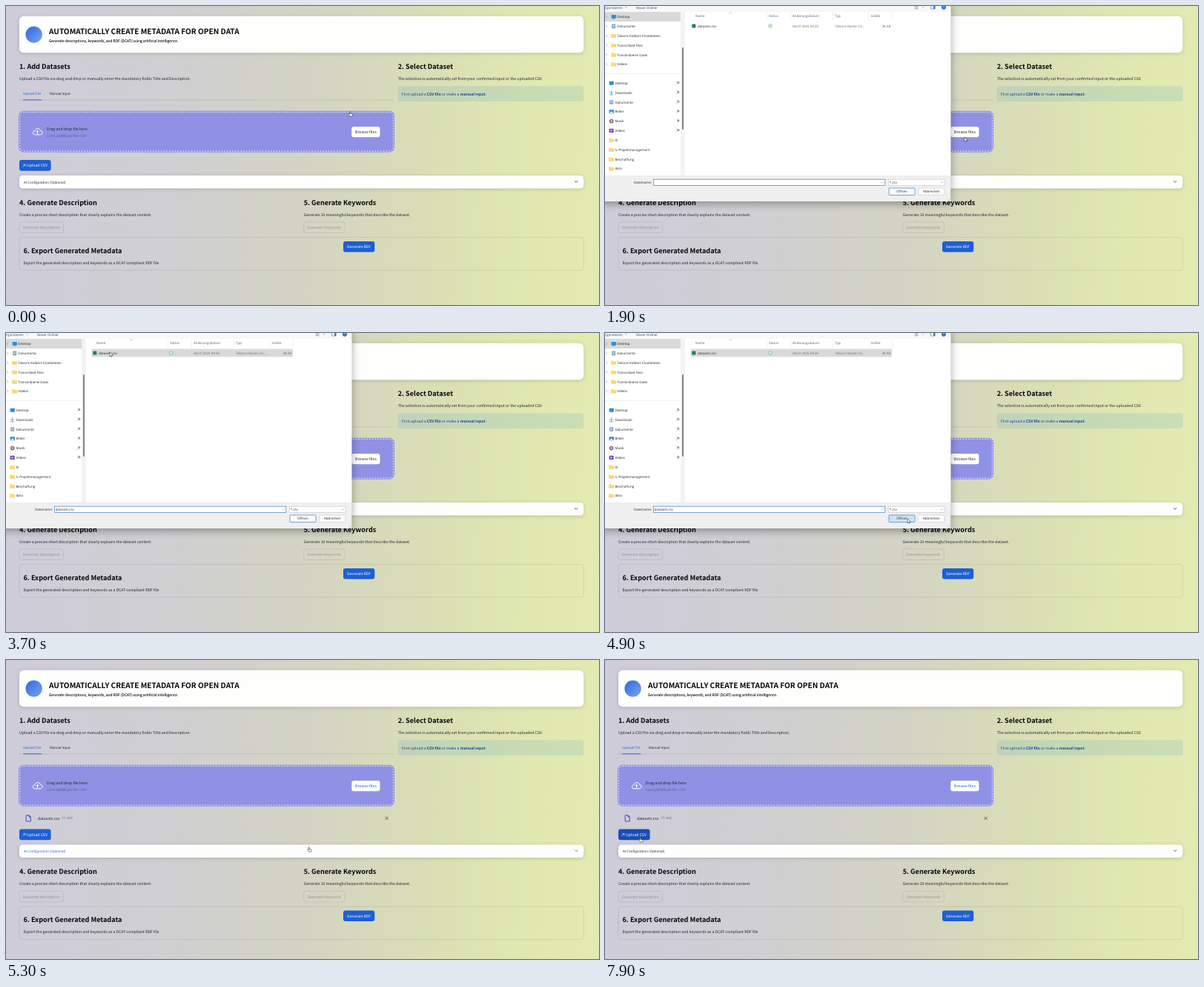
Animation, 800 px wide and 404 px high, one loop 8 s. Source, as an HTML page:

```html
<!DOCTYPE html>
<html lang="en">
<head>
<meta charset="utf-8">
<style>
  html, body { margin: 0; width: 100%; height: 100%; overflow: hidden; }
  body { background: linear-gradient(92deg, #cfccda 0%, #d0cfd0 30%, #d3d4c3 52%, #d9deb5 70%, #e0e8b0 88%, #e3ebb2 100%); }
  svg { display: block; width: 800px; height: 404px; }
  text { font-family: "Noto Sans CJK JP", "Noto Sans CJK SC", "Noto Sans CJK KR", sans-serif; text-rendering: geometricPrecision; white-space: pre; }
  .dialog text { font-family: "Open Sans", "Noto Sans", sans-serif; }
  .card { filter: drop-shadow(0 1.5px 2.5px rgba(0, 0, 0, .17)); }
  .window { filter: drop-shadow(0 3px 6px rgba(0, 0, 0, .35)); }
</style>
</head>
<body>
<svg id="stage" viewBox="0 0 800 404"></svg>
<script>
const INK = '#20222b', BLUE = '#1f5fd2', LINE = 'rgba(49,51,63,.18)', FADED = 'rgba(49,51,63,.38)';
const BODY = 5.17, SMALL = 4.53, HEAD = 9.12, WIN = 4.45;

const text = (x, y, s, size = BODY, fill = INK, extra = '') =>
  `<text x="${x}" y="${y}" font-size="${size}" fill="${fill}" ${extra}>${s}</text>`;
const head = (x, y, s, size = HEAD) => text(x, y, s, size, '#07080c', 'font-weight="700"');
const rect = (x, y, w, h, fill, r = 0, extra = '') =>
  `<rect x="${x}" y="${y}" width="${w}" height="${h}" rx="${r}" fill="${fill}" ${extra}/>`;
const path = (d, stroke, width = .7, fill = 'none', extra = '') =>
  `<path d="${d}" stroke="${stroke}" stroke-width="${width}" fill="${fill}" stroke-linejoin="round" stroke-linecap="round" ${extra}/>`;
const group = (id, body, extra = '') => `<g id="${id}" ${extra}>${body}</g>`;
const border = (color, width = .6) => `stroke="${color}" stroke-width="${width}"`;
const chevron = (x, y, r, stroke, width) => path(`M${x - r} ${y - r / 2}l${r} ${r}l${r} ${-r}`, stroke, width);

function header() {
  return rect(18, 13.7, 761.3, 49.6, '#fefefd', 6, 'class="card"') +
    '<circle cx="37.6" cy="38.6" r="11.2" fill="url(#disc)"/>' +
    head(58, 38.4, 'AUTOMATICALLY CREATE METADATA FOR OPEN DATA', 10.1) +
    text(58, 48.8, 'Generate descriptions, keywords, and RDF (DCAT) using artificial intelligence.', 4.9, '#0c0d12', border('#0c0d12', .1));
}

function upload() {
  return head(18, 85, '1. Add Datasets') +
    text(18, 100.1, 'Upload a CSV file via drag and drop or manually enter the mandatory fields Title and Description.') +
    text(23, 119.7, 'Upload CSV', SMALL, BLUE) + text(59, 119.7, 'Manual Input', SMALL) +
    rect(18, 126.7, 505, .6, LINE) + rect(23, 126.4, 25.3, .9, BLUE) +
    rect(17.6, 142.3, 505.8, 54.8, '#8f91e4', 6, border('#8083e0', 1)) +
    rect(18.6, 143.3, 503.8, 52.8, 'none', 5, border('#f4f4ff', .9) + ' stroke-dasharray="2.2 1.5"') +
    path('M39 173.9c-3.4 0-3.6-4.7-.2-5c.6-4.2 7-4.4 7.8-.3c3.5.2 3.3 5.3 0 5.3zM42.5 172.6v-4M40.8 170l1.7-1.7l1.7 1.7', '#fff', 1) +
    text(55, 168, 'Drag and drop file here') +
    text(55, 177.4, 'Limit 200MB per file • CSV', SMALL, '#55578f', 'font-style="italic"') +
    rect(466.3, 163, 38.2, 14.2, '#fff', 3) +
    text(471, 172, 'Browse files', BODY, INK, 'id="browse"');
}

function selection() {
  return head(528.7, 85, '2. Select Dataset') +
    text(528.7, 100.1, 'The selection is automatically set from your confirmed input or the uploaded CSV.') +
    rect(528.7, 108.2, 250.6, 20.8, 'rgba(28,131,205,.12)', 3) +
    text(534, 120.8, 'First upload a <tspan font-weight="700">CSV file</tspan> or make a <tspan font-weight="700">manual input</tspan>.', BODY, '#17478f');
}

function fileRow() {
  return path('M27.5 209.8h3.6l2.2 2.2v6h-5.8zM31 209.9v2.2h2.2', '#3b3fc4', .9) +
    text(43, 215.6, 'datasets.csv') + text(75.3, 215.4, '37.4KB', SMALL, '#77787e') +
    path('M511.8 212l3.6 3.6m0-3.6l-3.6 3.6', INK, .7);
}

function lower() {
  const outline = (x, w, label, tx) => rect(x, 292, w, 14.5, 'none', 3, border(LINE)) + text(tx, 301.2, label, BODY, FADED);
  return rect(18, 208, 42.6, 14.8, BLUE, 3, 'id="send"') +
    path('M22.8 217.2l3-3m-2.2-.1h2.3v2.3', '#fff', .6) + text(28, 217.4, 'Upload CSV', BODY, '#fff') +
    rect(18, 229, 761.3, 17.6, '#fefefd', 4.5, 'class="card"') +
    group('expander', text(24, 239.5, 'AI Configuration (Optional)', SMALL, 'currentColor') +
      chevron(769.2, 237.4, 1.7, 'currentColor', .8)) +
    head(18, 268.7, '4. Generate Description') +
    text(18, 283.5, 'Create a precise short description that clearly explains the dataset content.') +
    outline(18, 59.5, 'Generate description', 22.5) +
    head(401.7, 268.7, '5. Generate Keywords') +
    text(401.7, 283.5, 'Generate 10 meaningful keywords that describe the dataset.') +
    outline(401.7, 55.7, 'Generate keywords', 406.2) +
    rect(18, 312.6, 761.3, 44.4, 'none', 3, border(LINE)) +
    head(23.5, 334, '6. Export Generated Metadata') +
    text(23.5, 349, 'Export the generated description and keywords as a DCAT-compliant RDF file') +
    rect(455, 318, 42.3, 14.5, BLUE, 3) + text(460, 327.2, 'Generate RDF', 5.08, '#fff');
}

const folder = (x, y) => path(`M${x} ${y - 2.3}h2.2l.8.9h3.3v4h-6.3z`, '#f2c250', .3, '#fbd774');
const icons = {
  folder,
  desktop: (x, y) => rect(x, y - 2.5, 6.3, 4.6, '#2b8fd6', .7) + rect(x + 1.5, y + 2.1, 3.3, .7, '#55708a'),
  down: (x, y) => path(`M${x + 3} ${y - 2.7}v3.8m-1.7-1.6l1.7 1.7l1.7-1.7M${x + .6} ${y + 2.7}h4.8`, '#3f97c6', .8),
  doc: (x, y) => rect(x + .6, y - 2.8, 5, 5.6, '#7e9fc2', .6) + path(`M${x + 1.8} ${y - 1}h2.6m-2.6 1.7h2.6`, '#fff', .6),
  picture: (x, y) => rect(x, y - 2.6, 6.3, 5.2, '#2f86d2', .7) + path(`M${x + .7} ${y + 2}l2.4-2.6l2.4 2.6z`, '#fff', .2, '#fff'),
  music: (x, y) => `<circle cx="${x + 3.1}" cy="${y}" r="2.9" fill="#8a6f7a"/><circle cx="${x + 3.1}" cy="${y}" r="1" fill="#fff"/>`,
  video: (x, y) => rect(x, y - 2.7, 6, 5.4, '#7a3fc0', .7) + path(`M${x + 2.3} ${y - 1.2}l2 1.2l-2 1.2z`, '#fff', .2, '#fff')
};

function sidebar() {
  const tree = [['Desktop', 'desktop'], ['Dokumente', 'doc'], ['Talvoris Kolbert-Chatdateien', 'folder'],
    ['Transcribed Files', 'folder'], ['Transkribierte Datei', 'folder'], ['Videos', 'folder']];
  const pins = [['Desktop', 'desktop'], ['Downloads', 'down'], ['Dokumente', 'doc'], ['Bilder', 'picture'],
    ['Musik', 'music'], ['Videos', 'video'], ['KI', 'folder'], ['S. Projektmanagement', 'folder'],
    ['Beschaffung', 'folder'], ['data', 'folder']];
  let out = rect(0, 8, 102, 13, '#d9d9d9') + rect(0, 91.2, 102, .5, '#e0e0e0');
  tree.forEach(([name, icon], i) => {
    const y = 14.6 + i * 12.8;
    out += path(`M1.4 ${y - 1.4}l1.4 1.4l-1.4 1.4`, '#777', .5) + icons[icon](8.6, y) + text(16.3, y + 1.7, name, WIN);
  });
  pins.forEach(([name, icon], i) => {
    const y = 104.3 + i * 12.82;
    out += icons[icon](5.6, y) + text(13.4, y + 1.7, name, WIN);
    if (i < 6) out += path(`M96.6 ${y + 1.7}l1.4-1.6m-.8-1.4l2.1 2.1l.9-1.7l-1.1-1.1z`, '#6c7278', .5, '#9aa0a6');
  });
  return out + rect(102, 8, 5.8, 221, '#f3f3f3') + rect(104, 56, 1.9, 111, '#7b7b7b', .9);
}

function fileList() {
  const columns = [[122, 'Name'], [221, 'Status'], [253, 'Änderungsdatum'], [310.3, 'Typ'], [358.5, 'Größe']];
  return rect(112.5, 8, 105.7, 12, '#d9ebf9', 0, 'id="nameHover"') +
    [218.2, 250.3, 307.5, 355.7, 387.5].map(x => rect(x, 8, .5, 12, '#e3e3e3')).join('') +
    columns.map(([x, s]) => text(x, 15.3, s, WIN, '#4c607a')).join('') +
    path('M167.7 9.6l1.5-1.1l1.5 1.1', '#777', .4) +
    group('nameArrow', chevron(215.2, 13.8, 1, '#666', .4)) +
    rect(115.5, 21.4, 271.5, 10.9, '#d9d9d9', 0, 'id="row"') +
    rect(117.3, 24.4, 5, 5, '#21804c', .6) + text(125, 28.5, 'datasets.csv', WIN) +
    '<circle cx="223" cy="26.9" r="2.3" fill="#f3fbf3" stroke="#4aa65c" stroke-width=".6"/>' +
    path('M222 27l.8.8l1.3-1.6', '#4aa65c', .5) +
    text(253, 28.5, '08.07.2025 09:35', WIN, '#666') + text(310.3, 28.5, 'Talvoris Raster-CS...', WIN, '#666') +
    text(385.3, 28.5, '38 KB', WIN, '#666', 'text-anchor="end"');
}

function dialog() {
  const button = (x, label, color, id) => rect(x, 246, 35, 9.6, '#fdfdfd', 1, `id="${id}" ` + border(color, .7)) +
    text(x + 17.5, 252.4, label, WIN, INK, 'text-anchor="middle"');
  return rect(-10, -10, 476.3, 274, '#f0f0f0', 0, 'class="window"') + rect(0, 7.5, 466.3, 221.8, '#fff') +
    rect(0, 0, 466.3, 7.5, '#f8f8f8') +
    text(-3.2, 3.8, 'Organisieren', WIN, '#2d4668') + chevron(28.5, 2, .9, '#444', .5) +
    text(42, 3.8, 'Neuer Ordner', WIN, '#2d4668') +
    path('M418.2.6h4m-4 1.6h4m-4 1.6h4', '#777', .6) + chevron(429, 2, .9, '#444', .5) +
    rect(439.5, -1, 5.6, 5, '#fff', .5, border('#2d6fae')) + rect(443, -1, 2.2, 5, '#2d7fc4') +
    '<circle cx="457" cy="1.8" r="3" fill="#2479c9"/>' + text(456, 3.4, '?', 4, '#fff') +
    sidebar() + fileList() + rect(0, 229.2, 466.3, .4, '#dedede') +
    text(39, 240.1, 'Dateiname:', WIN) +
    rect(65.3, 234.2, 312.5, 8.4, '#fff', 0, border('#3c86c8', .7)) +
    text(66.6, 240.1, 'datasets.csv', WIN, INK, 'id="chosen"') + chevron(374.5, 238.4, 1, '#555', .5) +
    rect(382.3, 234.2, 75.7, 8.4, '#fff', 0, border('#c4c4c4')) + text(383.8, 240.1, '*.csv', WIN) +
    chevron(454.5, 238.4, 1, '#555', .5) +
    button(383, 'Öffnen', '#2f80c8', 'open') + button(422.8, 'Abbrechen', '#cfcfcf', 'cancel') +
    path('M464.8 260.2v.1m0 2v.1m-2-.1v.1', '#aaa', .8);
}

const pointers =
  group('arrow', path('M0 0v5.6l1.3-1.2l.9 2l.9-.4l-.9-2h1.8z', '#222', .5, '#fff')) +
  group('hand', path('M0 .5c0-.8 1.1-.8 1.1 0v2.1l2.3.5c.6.2.8.5.7 1.1l-.4 2.1h-2.9l-1.9-2.5c-.4-.6.3-1.1.8-.7l.3.3z', '#222', .55, '#fff'));

document.getElementById('stage').innerHTML =
  '<defs><linearGradient id="disc" x2="1" y2="1"><stop stop-color="#2c69dc"/><stop offset="1" stop-color="#78a4f1"/></linearGradient></defs>' +
  header() + upload() + selection() + group('file', fileRow()) + group('lower', lower()) +
  group('dialog', dialog(), 'class="dialog"') + group('cursor', pointers);

const el = Object.fromEntries([...document.querySelectorAll('[id]')].map(e => [e.id, e]));
const show = (e, on) => e.setAttribute('display', on ? 'inline' : 'none');

// Cursor stops: time, x, y
const stops = [[0, 463.5, 142.6], [600, 463.5, 142.6], [1500, 485, 177.6], [1900, 485, 177.6], [2600, 147, 11.6],
  [2800, 147, 11.6], [3300, 140, 26], [3800, 140, 26], [4600, 408, 251.2], [5000, 408, 251.2], [5200, 408, 252.8],
  [5300, 408, 252.8], [6100, 120, 264.8], [6300, 120, 264.8], [7200, 47, 239.6], [8000, 47, 239.6]];

function cursorAt(t) {
  const i = stops.findIndex(s => s[0] > t);
  const [t0, x0, y0] = stops[i - 1], [t1, x1, y1] = stops[i];
  const p = (t - t0) / (t1 - t0), e = p * p * (3 - 2 * p);
  return [x0 + (x1 - x0) * e, y0 + (y1 - y0) * e];
}

function draw(now) {
  const t = Math.floor(now % 8000 / 100) * 100;
  const [x, y] = cursorAt(t);
  const opened = t >= 1800 && t < 5000, loaded = t >= 5200, picked = t >= 3600;
  const shift = loaded ? 20.4 : 0;
  const over = (x0, y0, x1, y1) => x >= x0 && x <= x1 && y >= y0 && y <= y1;

  show(el.dialog, opened);
  show(el.file, loaded);
  el.lower.setAttribute('transform', `translate(0 ${shift})`);
  el.browse.setAttribute('fill', loaded ? BLUE : INK);
  el.expander.setAttribute('color', !opened && over(18, 229 + shift, 779, 246.6 + shift) ? BLUE : INK);
  el.send.setAttribute('fill', !opened && over(18, 208 + shift, 60.6, 222.8 + shift) ? '#194fb3' : BLUE);

  const onName = over(112, 8, 218, 20);
  show(el.nameHover, onName);
  show(el.nameArrow, onName);
  show(el.row, picked || over(115, 21, 387, 33));
  el.row.setAttribute('fill', picked ? '#d9d9d9' : '#e5f3ff');
  show(el.chosen, picked);
  el.open.setAttribute('fill', over(383, 246, 418, 256) ? '#cce4f7' : '#fdfdfd');

  el.cursor.setAttribute('transform', `translate(${x} ${y})`);
  show(el.arrow, opened);
  show(el.hand, !opened);
}

const start = performance.now();
function tick() {
  draw(performance.now() - start);
  requestAnimationFrame(tick);
}
tick();
</script>
</body>
</html>
```
